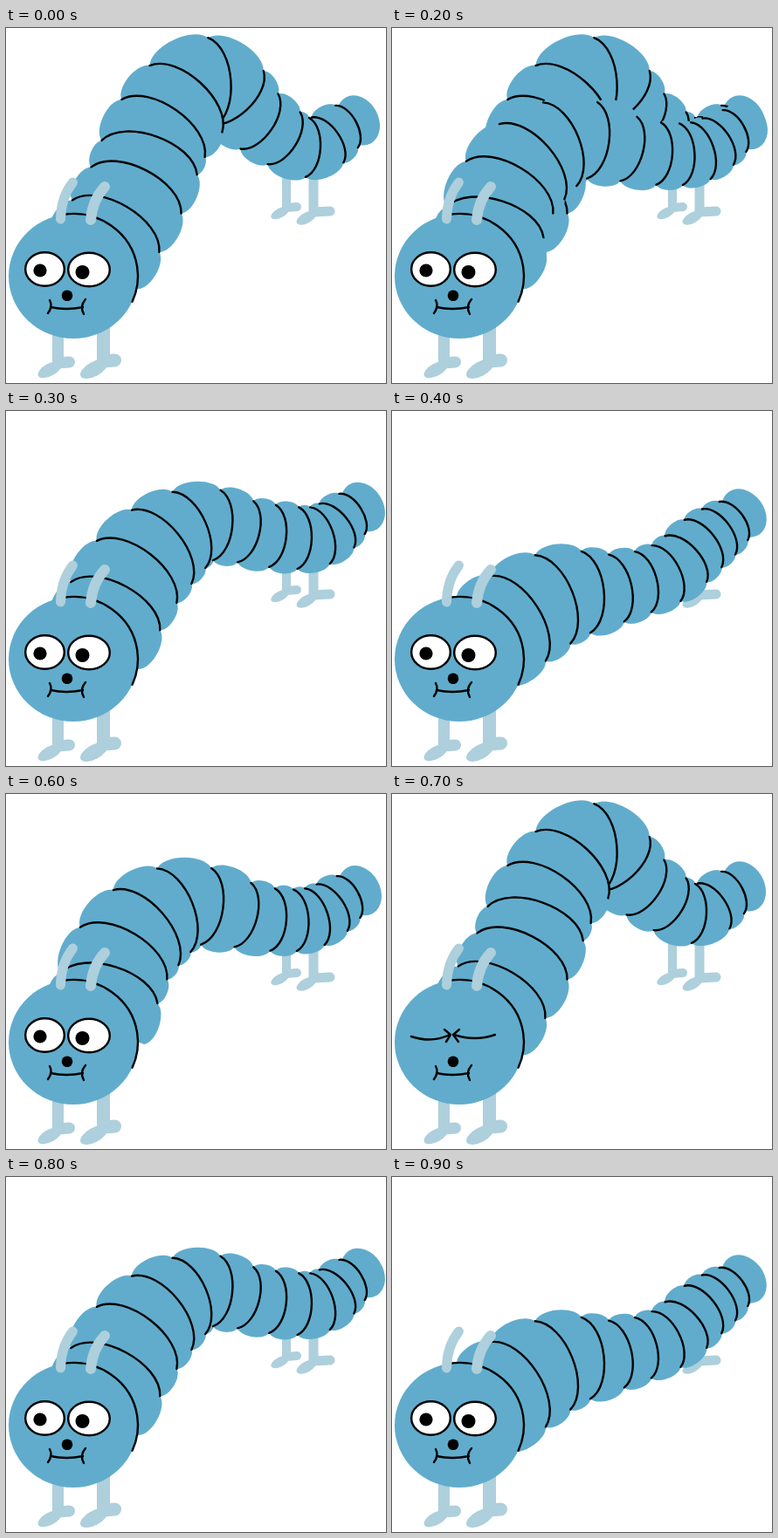
Recreate the animation shown at these times as an HTML page with a canvas. Size 435 by 407 pixels, loop 1000 ms.

```html
<!DOCTYPE html>
<html lang="en">
<head>
<meta charset="utf-8">
<title>Inching caterpillar</title>
<style>
  html, body { margin: 0; width: 100%; height: 100%; overflow: hidden; background: #fff; }
  canvas { display: block; }
</style>
</head>
<body>
<canvas id="stage" width="435" height="407"></canvas>
<script>
const ctx = document.getElementById('stage').getContext('2d');
const BLUE = '#61accc', PALE = '#aecfdc', INK = '#000';
const LINE = 2.4;
const STEP = 100;
const LINE_BULGE = 0.22, SIDE_BULGE = 0.2;
const FRONT_HALF = 58, REAR_HALF = 36;

// A pose is a spine from neck to tail, a ring count,
// and the place along the spine where the body thins out.
const high = {
  rings: 12, thin: 0.55,
  spine: [[100, 270], [149, 186], [180, 115], [235, 62], [290, 107], [345, 137], [390, 113]]
};
const lowering = {
  rings: 11, thin: 0.42,
  spine: [[104, 266], [139, 176], [206, 129], [293, 143], [349, 142], [392, 118]]
};
const middle = {
  rings: 11, thin: 0.37,
  spine: [[102, 266], [155, 178], [222, 132], [293, 142], [355, 144], [396, 118]]
};
const low = {
  rings: 10, thin: 0.3,
  spine: [[104, 264], [184, 216], [257, 203], [314, 186], [356, 152], [391, 126]]
};

// One entry per step; poses sharing a step overlap.
const steps = [
  [high], [high], [high, lowering], [middle], [low],
  [middle], [lowering], [high], [middle], [low]
];
const BLINK_STEP = 7;

const mix = (a, b, t) => a + (b - a) * t;

function smooth(t) {
  t = Math.min(1, Math.max(0, t));
  return t * t * (3 - 2 * t);
}

function line(color, width, trace) {
  ctx.strokeStyle = color;
  ctx.lineWidth = width;
  ctx.beginPath();
  trace();
  ctx.stroke();
}

function oval(color, x, y, rx, ry = rx, turn = 0) {
  ctx.fillStyle = color;
  ctx.beginPath();
  ctx.ellipse(x, y, rx, ry, turn, 0, Math.PI * 2);
  ctx.fill();
}

function curve(x0, y0, cx, cy, x1, y1) {
  ctx.moveTo(x0, y0);
  ctx.quadraticCurveTo(cx, cy, x1, y1);
}

function bend(x0, y0, x1, y1, x2, y2) {
  ctx.moveTo(x0, y0);
  ctx.lineTo(x1, y1);
  ctx.lineTo(x2, y2);
}

// Adds an arc from a to b, bulging left of the way by a share of its length.
function arc(a, b, bulge) {
  const dx = b[0] - a[0], dy = b[1] - a[1], inset = 0.14;
  const nx = dy * bulge * 4 / 3, ny = -dx * bulge * 4 / 3;
  ctx.bezierCurveTo(
    a[0] + dx * inset + nx, a[1] + dy * inset + ny,
    b[0] - dx * inset + nx, b[1] - dy * inset + ny, b[0], b[1]);
}

// Position and heading on a Catmull-Rom spline, t from 0 to 1.
function along(keys, t) {
  const last = keys.length - 1;
  const i = Math.min(last - 1, Math.floor(t * last)), u = t * last - i;
  const p = keys[i], q = keys[i + 1];
  const before = keys[i - 1] || p.map((v, k) => 2 * v - q[k]);
  const after = keys[i + 2] || q.map((v, k) => 2 * v - p[k]);
  const axis = k => {
    const m = (q[k] - before[k]) / 2, n = (after[k] - p[k]) / 2;
    const c = 3 * (q[k] - p[k]) - 2 * m - n, d = m + n - 2 * (q[k] - p[k]);
    return [p[k] + u * (m + u * (c + u * d)), m + u * (2 * c + 3 * u * d)];
  };
  const [x, dx] = axis(0), [y, dy] = axis(1);
  return { x, y, angle: Math.atan2(dy, dx) };
}

function ringAt({ spine, thin }, t) {
  const { x, y, angle } = along(spine, t);
  const taper = smooth((t - thin) / 0.4 + 0.5);
  const half = mix(FRONT_HALF, REAR_HALF, taper) * (1 - 0.24 * t ** 8);
  const ax = Math.sin(angle) * half, ay = -Math.cos(angle) * half;
  return { x, y, angle, half, top: [x + ax, y + ay], bottom: [x - ax, y - ay] };
}

// Rings go from tail to head, so each covers the one behind it.
function drawBody(pose) {
  const tail = ringAt(pose, 1), reach = 15;
  oval(BLUE, tail.x + Math.cos(tail.angle) * reach, tail.y + Math.sin(tail.angle) * reach,
    23, tail.half * 1.1, tail.angle);

  for (let i = pose.rings; i > 0; i--) {
    const back = ringAt(pose, i / pose.rings), front = ringAt(pose, (i - 1) / pose.rings);
    ctx.fillStyle = BLUE;
    ctx.beginPath();
    ctx.moveTo(...front.top);
    arc(front.top, back.top, SIDE_BULGE);
    arc(back.top, back.bottom, LINE_BULGE);
    arc(back.bottom, front.bottom, SIDE_BULGE);
    ctx.fill();
    line(INK, LINE, () => {
      ctx.moveTo(...back.top);
      arc(back.top, back.bottom, LINE_BULGE);
    });
  }
}

function drawLeg(x, top, ankle, width, toe) {
  line(PALE, width, () => bend(x, top, x, ankle, x + toe, ankle - 1));
  oval(PALE, x - width * 0.72, ankle + width * 0.6, width * 1.15, width * 0.55, -0.5);
}

function drawEye(x, y, rx, pupilX, pupilY, pupilR) {
  const ry = 19.3;
  oval('#fff', x, y, rx, ry);
  line(INK, LINE, () => ctx.ellipse(x, y, rx, ry, 0, 0, Math.PI * 2));
  oval(INK, pupilX, pupilY, pupilR);
}

function drawShutEyes() {
  line(INK, LINE, () => {
    curve(22, 278, 46, 286, 66, 276);
    bend(60, 270, 67, 276, 62, 284);
    curve(118, 276, 95, 284, 71, 276);
    bend(77, 270, 70, 276, 76, 284);
  });
}

function drawHead(blinking) {
  const x = 77, y = 284.5, rx = 74, ry = 71.5;
  oval(BLUE, x, y, rx, ry);
  line(INK, LINE, () => ctx.ellipse(x, y, rx, ry, 0, -1.72, 0.42));

  line(PALE, 11, () => curve(62.5, 219, 63, 194, 76.5, 177));
  line(PALE, 12, () => curve(97, 220, 99, 197, 113, 182));

  if (blinking) {
    drawShutEyes();
  } else {
    drawEye(44.5, 276.5, 22.3, 39, 278, 7.6);
    drawEye(95, 277, 23.8, 87.5, 280, 8);
  }

  oval(INK, 70, 306.7, 6.3);
  line(INK, LINE, () => {
    curve(51, 320, 69, 324, 88, 320);
    curve(50, 312, 54, 319, 48, 327);
    curve(91, 311, 84, 319, 89, 328);
  });
}

function draw(now) {
  const step = Math.floor(now / STEP) % steps.length;
  ctx.fillStyle = '#fff';
  ctx.fillRect(0, 0, 435, 407);
  ctx.lineCap = ctx.lineJoin = 'round';

  drawLeg(321, 172, 206, 10, 12);
  drawLeg(352, 172, 211, 11, 19);
  drawLeg(59.5, 345, 384, 13, 13);
  drawLeg(111.5, 340, 382, 15, 13);
  steps[step].forEach(drawBody);
  drawHead(step === BLINK_STEP);
}

const began = performance.now();
function tick() {
  draw(performance.now() - began);
  requestAnimationFrame(tick);
}
tick();
</script>
</body>
</html>
```
